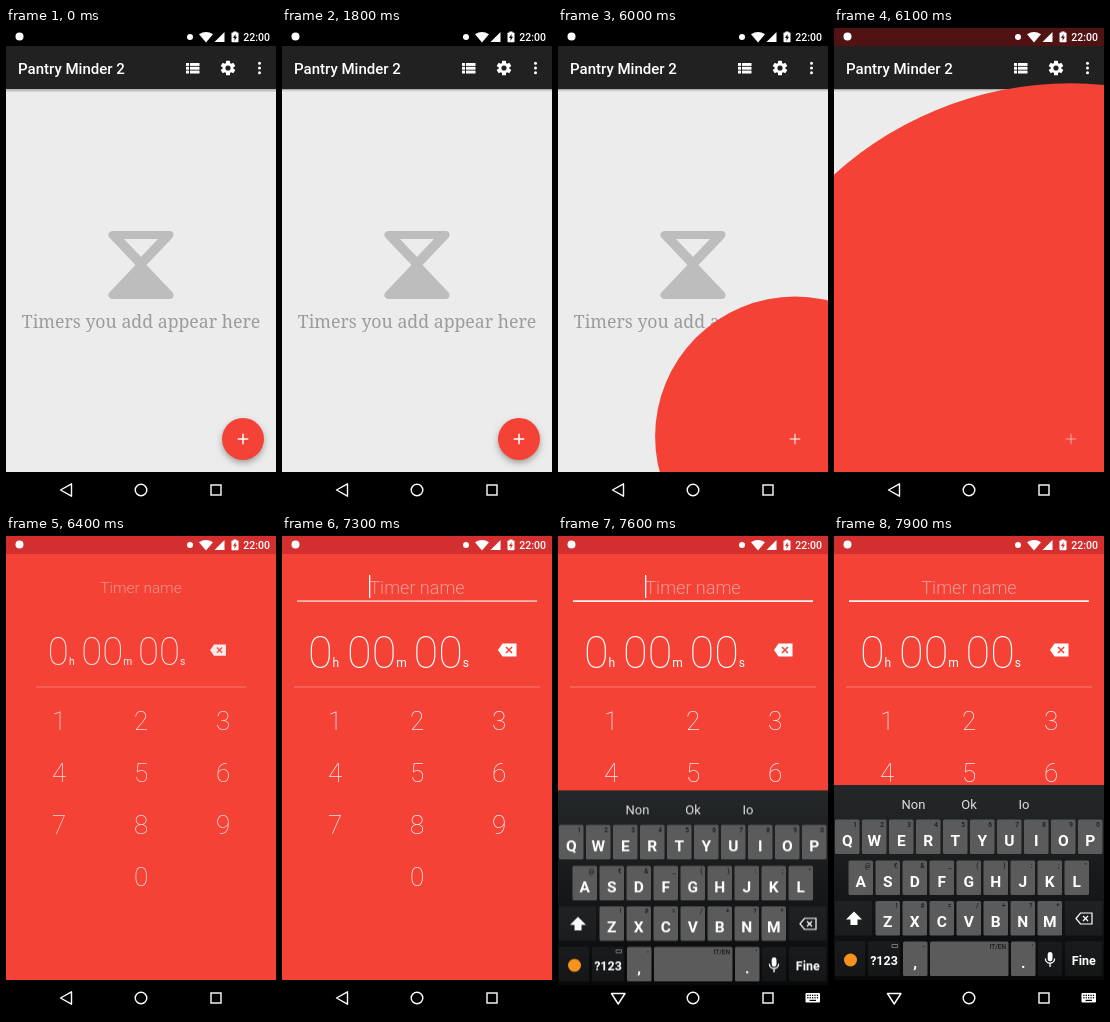
These frames come from a looping animation (270 px wide and 480 px high, 8000 ms). An HTML page with a canvas:

```html
<!DOCTYPE html>
<html lang="en">
<head>
<meta charset="utf-8">
<title>Timer app</title>
<style>
html, body { margin: 0; width: 100%; height: 100%; overflow: hidden; background: #000; }
canvas { display: block; width: 100vw; height: 100vh; }
</style>
</head>
<body>
<canvas id="stage"></canvas>
<script>
const W = 270, H = 480, LOOP = 8000;
const RED = '#f44336', DARK_RED = [211, 47, 47];
const FAB = { x: 237, y: 411, r: 21 };
const SANS = 'Roboto, sans-serif';
const canvas = document.getElementById('stage');
const sheet = document.createElement('canvas');
const stageCtx = canvas.getContext('2d');
const sheetCtx = sheet.getContext('2d');
let ctx = stageCtx;

const clamp = v => Math.max(0, Math.min(1, v));
const progress = (t, from, to) => clamp((t - from) / (to - from));
const easeInOut = p => 0.5 - Math.cos(p * Math.PI) / 2;
const easeOut = p => 1 - (1 - p) ** 2;
const mix = (a, b, p) => a + (b - a) * p;
const mixColor = (a, b, p) => `rgb(${a.map((v, i) => Math.round(mix(v, b[i], p)))})`;

function rect(x, y, w, h, color) {
  ctx.fillStyle = color;
  ctx.fillRect(x, y, w, h);
}

function roundRect(x, y, w, h, r, color) {
  ctx.beginPath();
  ctx.roundRect(x, y, w, h, r);
  ctx.fillStyle = color;
  ctx.fill();
}

function disc(x, y, r, color) {
  ctx.beginPath();
  ctx.arc(x, y, r, 0, Math.PI * 2);
  ctx.fillStyle = color;
  ctx.fill();
}

function trace(points, closed = true) {
  ctx.beginPath();
  points.forEach(([x, y]) => ctx.lineTo(x, y));
  if (closed) ctx.closePath();
}

function poly(points, color) {
  trace(points);
  ctx.fillStyle = color;
  ctx.fill();
}

function line(points, color, width, closed = false) {
  trace(points, closed);
  ctx.strokeStyle = color;
  ctx.lineWidth = width;
  ctx.stroke();
}

function text(str, x, y, size, color, weight = 400, align = 'center', family = SANS) {
  ctx.font = `${weight} ${size}px ${family}`;
  ctx.textAlign = align;
  ctx.fillStyle = color;
  ctx.fillText(str, x, y);
}

function layer(alpha, draw) {
  if (alpha <= 0) return;
  ctx.save();
  ctx.globalAlpha *= alpha;
  draw();
  ctx.restore();
}

function scaled(x, y, s, draw) {
  ctx.save();
  ctx.translate(x, y);
  ctx.scale(s, s);
  ctx.translate(-x, -y);
  draw();
  ctx.restore();
}

function statusBar(p) {
  const bg = mixColor([0, 0, 0], DARK_RED, p);
  rect(0, 0, W, 18, bg);
  disc(13.5, 8.5, 4, '#fff');
  disc(184, 9, 3, '#fff');
  ctx.beginPath();
  ctx.moveTo(200, 14.5);
  ctx.lineTo(193, 6.3);
  ctx.quadraticCurveTo(200, 1.6, 207, 6.3);
  ctx.fillStyle = '#fff';
  ctx.fill();
  poly([[218.5, 4], [218.5, 14], [208.5, 14]], '#fff');
  rect(227.5, 3.5, 3, 2, '#fff');
  roundRect(225.5, 4.5, 7, 9.8, 0.8, '#fff');
  poly([[229.6, 6], [227, 10], [228.7, 10], [228.4, 13], [231, 8.8], [229.4, 8.8]], bg);
  text('22:00', 264, 13, 10.5, '#fff', 500, 'right');
}

function gear(x, y) {
  ctx.save();
  ctx.translate(x, y);
  disc(0, 0, 5.4, '#fff');
  for (let i = 0; i < 6; i++) {
    ctx.rotate(Math.PI / 3);
    roundRect(-2, -7.3, 4, 4, 0.6, '#fff');
  }
  disc(0, 0, 2.6, '#212121');
  ctx.restore();
}

function toolbar(settle) {
  const shadow = ctx.createLinearGradient(0, 61, 0, 64);
  shadow.addColorStop(0, `rgba(0,0,0,${mix(0.24, 0.36, settle)})`);
  shadow.addColorStop(mix(0.75, 0.5, settle), `rgba(0,0,0,${mix(0.16, 0.12, settle)})`);
  shadow.addColorStop(1, 'rgba(0,0,0,0)');
  rect(0, 61, W, 3, shadow);
  rect(0, 18, W, 43, '#212121');
  text('Pantry Minder 2', 12, 45.5, 15, '#fff', 500, 'left');
  for (let i = 0; i < 3; i++) {
    const y = 35 + i * 3.8;
    rect(180, y, 3, 2.9, '#fff');
    rect(184, y, 9.5, 2.9, '#fff');
    disc(253.5, 35.3 + i * 4.7, 1.5, '#fff');
  }
  gear(222, 40);
}

function hourglass() {
  const grey = '#bdbdbd', bg = '#ececec';
  ctx.lineJoin = 'round';
  for (const y of [207, 267]) {
    const shape = [[106.5, y], [163.5, y], [135, 237]];
    poly(shape, grey);
    line(shape, grey, 8, true);
  }
  ctx.lineJoin = 'miter';
  poly([[118, 211], [152, 211], [135, 229]], bg);
}

function plus(alpha) {
  layer(alpha, () => {
    rect(FAB.x - 5.25, FAB.y - 0.75, 10.5, 1.5, '#fff');
    rect(FAB.x - 0.75, FAB.y - 5.25, 1.5, 10.5, '#fff');
  });
}

function listScreen(t) {
  rect(0, 18, W, 426, '#ececec');
  toolbar(progress(t, 1300, 1800));
  hourglass();
  text('Timers you add appear here', 135, 299.7, 17.7, '#9c9c9c', 400, 'center', '"Noto Serif", serif');

  const reveal = easeInOut(progress(t, 5891, 6213));
  if (reveal === 0) {
    ctx.save();
    ctx.shadowColor = 'rgba(0,0,0,0.32)';
    ctx.shadowBlur = 6 * ctx.getTransform().a;
    ctx.shadowOffsetY = 3 * ctx.getTransform().a;
    disc(FAB.x, FAB.y, FAB.r, RED);
    ctx.restore();
  } else {
    disc(FAB.x, FAB.y - 2.5 * Math.min(1, reveal * 4), mix(FAB.r, 476, reveal), RED);
  }
  plus(1 - progress(t, 5900, 6180) * 0.9);
}

function timeDisplay() {
  const groups = [['0', 25.9, 'h'], ['00', 65, 'm'], ['00', 131.5, 's']];
  for (const [digits, x, unit] of groups) {
    text(digits, x, 131.5, 45, '#fff', 200, 'left');
    text(unit, x + ctx.measureText(digits).width, 131, 12, '#fff', 400, 'left');
  }
  poly([[216, 114], [220.5, 107.5], [234.5, 107.5], [234.5, 120.5], [220.5, 120.5]], '#fff');
  line([[224, 111], [230, 117]], RED, 1.6);
  line([[230, 111], [224, 117]], RED, 1.6);
}

function numpad() {
  for (let n = 1; n <= 10; n++) {
    const col = n === 10 ? 1 : (n - 1) % 3;
    const row = Math.floor((n - 1) / 3);
    text(String(n % 10), 53 + col * 82, 193.5 + row * 52, 26, '#fff', 200);
  }
}

function entryScreen(t) {
  rect(0, 18, W, 426, RED);
  const scale = mix(0.7, 1, easeOut(progress(t, 6250, 6750)));
  layer(progress(t, 6250, 6420), () => {
    scaled(135, 51, scale, () => text('Timer name', 135, 57.5, 18, '#ee9d95', 300));
    scaled(135, 115, scale, timeDisplay);
    const half = 123 * scale;
    rect(135 - half, 150.5, half * 2, 1, 'rgba(255,255,255,0.3)');
    numpad();
  });
  layer(progress(t, 7200, 7350), () => rect(15, 64.3, 240, 1.6, '#fff'));
  if (t >= 7300 && t < 7800) rect(87, 39, 1.3, 23, '#fff');
}

function key(x, y, w, label, hint, opts = {}) {
  roundRect(x, y, w, 34.5, 1.5, opts.color || '#5b5b5b');
  if (label) text(label, x + w / 2, y + (opts.dy || 26), opts.size || 15.5, '#fff', 700);
  if (hint) text(hint, x + w - 2.5, y + 7, 6.5, '#1c1c1c', 500, 'right');
}

function keyRow(letters, hints, x, y) {
  [...letters].forEach((c, i) => key(x + i * 27, y, 24.5, c, hints[i]));
}

function keyboard() {
  const dark = { color: 'rgba(255,255,255,0.05)', size: 12.5, dy: 23 };
  const panel = ctx.createLinearGradient(0, 249, 0, 444);
  panel.addColorStop(0, '#25282a');
  panel.addColorStop(1, '#08090a');
  rect(0, 249, W, 195, panel);
  [['Non', 79.5], ['Ok', 135], ['Io', 190]].forEach(([w, x]) => text(w, x, 272.5, 13, '#dedede'));
  keyRow('QWERTYUIOP', '1234567890', 1, 283.5);
  keyRow('ASDFGHJKL', '@€&_():;"', 14.5, 324.5);
  keyRow('ZXCVBNM', '!#=/+?*', 41.5, 365);
  key(1, 365, 37, '', '', dark);
  key(231, 365, 37.5, '', '', dark);
  key(1, 405.5, 30, '', '', dark);
  key(34, 405.5, 32, '?123', '', dark);
  key(69, 405.5, 24.5, ',', '-');
  key(96, 405.5, 78.5, '', 'IT/EN');
  key(177, 405.5, 24.5, '.', "'");
  key(204, 405.5, 24, '', '', dark);
  key(231, 405.5, 37.5, 'Fine', '', dark);

  poly([[20, 375.5], [28, 383.5], [23.5, 383.5], [23.5, 389], [16.5, 389], [16.5, 383.5], [12, 383.5]], '#fff');
  line([[242, 382.5], [246.5, 377], [258, 377], [258, 388], [246.5, 388]], '#fff', 1.2, true);
  line([[249, 380], [254, 385]], '#fff', 1.3);
  line([[254, 380], [249, 385]], '#fff', 1.3);
  disc(16.5, 424, 6.5, '#f7921e');
  line([[58, 408.5], [63.5, 408.5], [63.5, 411.5], [58, 411.5]], '#8a8a8a', 0.8, true);

  roundRect(213.7, 416, 4.8, 9.5, 2.4, '#fff');
  ctx.beginPath();
  ctx.arc(216, 422.5, 4.6, 0, Math.PI);
  ctx.strokeStyle = '#fff';
  ctx.lineWidth = 1.3;
  ctx.stroke();
  rect(215.4, 427, 1.3, 4, '#fff');
}

// Drawn on its own sheet first, so keys and panel fade as one.
function fadedKeyboard(t) {
  const alpha = progress(t, 7360, 7555);
  if (!alpha) return;
  const shift = 26 * (1 - progress(t, 7360, 7800)) ** 2;
  ctx = sheetCtx;
  fit(sheet);
  ctx.clearRect(0, 0, W, H);
  keyboard();
  ctx = stageCtx;
  layer(alpha, () => ctx.drawImage(sheet, 0, shift, W, H));
}

function navIcons(typing) {
  ctx.lineJoin = 'round';
  line(typing ? [[53.5, 457.5], [67, 457.5], [60.2, 468]] : [[54.5, 462], [65.5, 455.8], [65.5, 468.2]], '#fff', 1.4, true);
  ctx.lineJoin = 'miter';
  ctx.beginPath();
  ctx.arc(135, 462, 5.8, 0, Math.PI * 2);
  ctx.stroke();
  ctx.strokeRect(205, 457, 10, 10);
  if (!typing) return;
  roundRect(247.5, 457, 14.5, 9.5, 1, '#fff');
  for (let i = 0; i < 10; i++) {
    rect(249.2 + (i % 5) * 2.4, 458.7 + Math.floor(i / 5) * 2.4, 1.3, 1.3, '#000');
  }
  rect(251.5, 463.8, 6.5, 1.2, '#000');
}

function fit(target) {
  const dpr = window.devicePixelRatio || 1;
  const w = Math.round(innerWidth * dpr), h = Math.round(innerHeight * dpr);
  if (target.width !== w || target.height !== h) {
    target.width = w;
    target.height = h;
  }
  ctx.setTransform(w / W, 0, 0, h / H, 0, 0);
}

function render(t) {
  fit(canvas);
  if (t < 6213) listScreen(t);
  else entryScreen(t);
  rect(0, 444, W, 36, '#000');
  fadedKeyboard(t);
  statusBar(progress(t, 6040, 6200));
  navIcons(t >= 7400);
}

const start = performance.now();
function tick() {
  render((performance.now() - start) % LOOP);
  requestAnimationFrame(tick);
}
tick();
</script>
</body>
</html>
```
